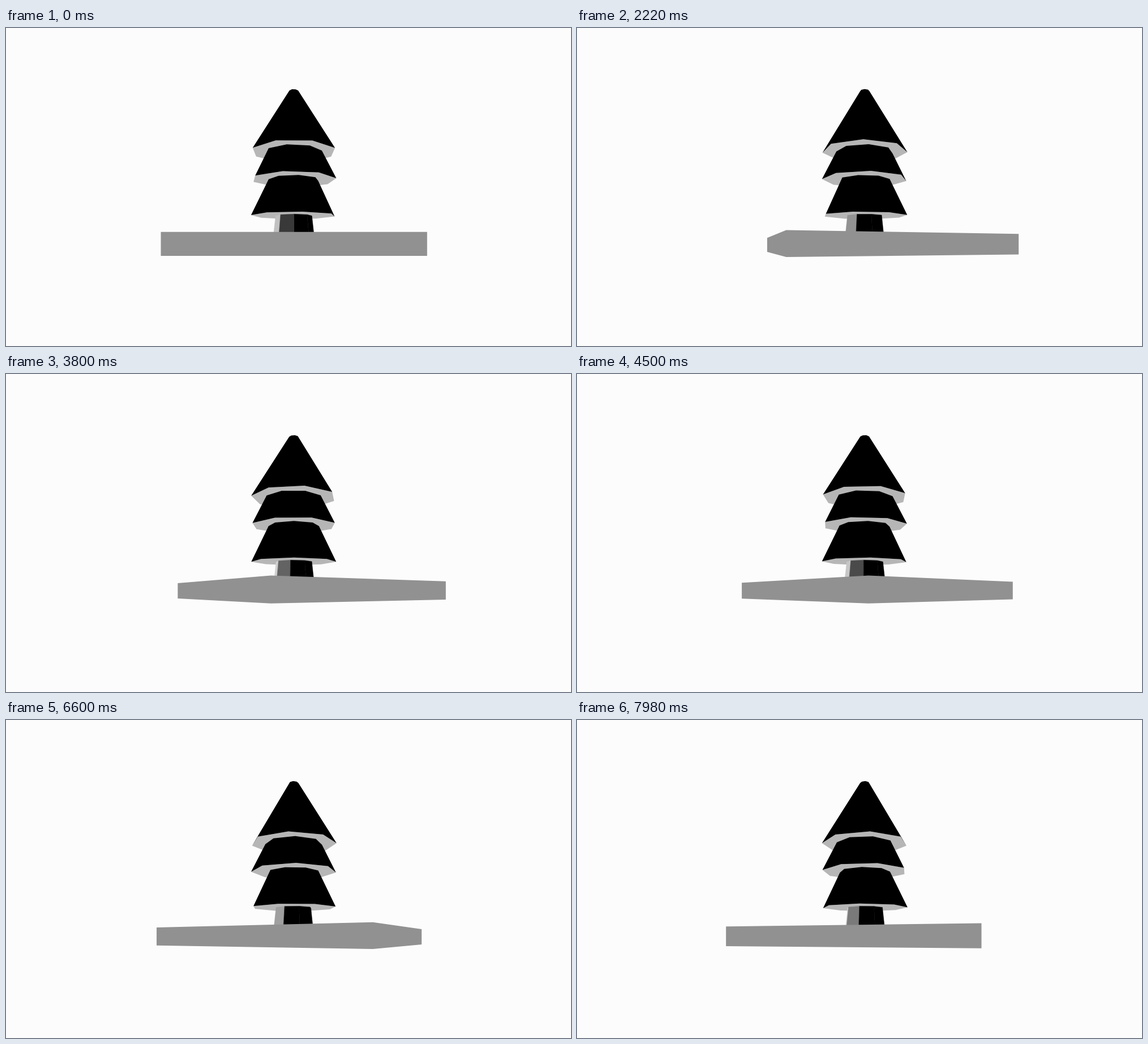
An HTML page with a canvas that plays this animation: 998 by 561 pixels, repeating every 8 s.

```html
<!DOCTYPE html>
<html lang="en">
<head>
<meta charset="utf-8">
<title>Turning tree</title>
<style>
  html, body { margin: 0; width: 100%; height: 100%; overflow: hidden; background: #fcfcfc; }
  canvas { display: block; }
</style>
</head>
<body>
<canvas id="stage" width="998" height="561"></canvas>
<script>
const ctx = document.getElementById('stage').getContext('2d');
const LOOP = 8000, START = 0.4, DEGREES_PER_SECOND = 9.2;
const AXIS_X = 508.3, HORIZON = 385.3, DISTANCE = 612;
const UNDERSIDE = '#b6b6b6', PLATFORM = '#919191';
const rad = degrees => degrees * Math.PI / 180;

// Each tier: lower radius and height, upper radius and height, twist in degrees.
const tiers = [
  [75, 165.8, 8.3, 273.7, 22.5],
  [75, 117, 50, 165.8, 31.5],
  [75, 54, 44.5, 117, 10]
];

// Platform corners as [radius, angle], angle 0 facing the viewer.
const corners = [[228, -138.4], [249.5, -40.9], [249.3, 40.4], [233, 136.7]];

let turn = 0;

function project([radius, angle], height) {
  const a = rad(angle + turn);
  const scale = 1 / (1 - radius * Math.cos(a) / DISTANCE);
  return [AXIS_X + radius * Math.sin(a) * scale, HORIZON - height * scale];
}

const octagon = (radius, twist) =>
  Array.from({ length: 8 }, (_, i) => [radius, twist + i * 45]);

function tracePolygon(points) {
  points.forEach(([x, y], i) => i ? ctx.lineTo(x, y) : ctx.moveTo(x, y));
  ctx.closePath();
}

function fillPolygons(polygons, color) {
  ctx.beginPath();
  polygons.forEach(tracePolygon);
  ctx.fillStyle = color;
  ctx.fill();
}

function facesViewer([a, b, c, d]) {
  return (c[0] - a[0]) * (d[1] - b[1]) - (c[1] - a[1]) * (d[0] - b[0]) < 0;
}

// Visible side faces of a prism or frustum, with the index of each face.
function sides(lower, low, upper, high) {
  const bottom = lower.map(p => project(p, low));
  const top = upper.map(p => project(p, high));
  return bottom.map((point, i) => {
    const next = (i + 1) % bottom.length;
    return { index: i, quad: [point, bottom[next], top[next], top[i]] };
  }).filter(face => facesViewer(face.quad));
}

function drawTier([radius, low, topRadius, high, twist]) {
  const base = octagon(radius, twist);
  fillPolygons([base.map(p => project(p, low))], UNDERSIDE);
  const faces = sides(base, low, octagon(topRadius, twist), high);
  fillPolygons(faces.map(face => face.quad), '#000');
}

// Light comes from the left, slightly behind the tree.
function trunkShade(normal) {
  const light = Math.max(0, Math.sin(rad(-normal - 14)));
  const gray = Math.round(225 * light ** 0.7);
  return `rgb(${gray},${gray},${gray})`;
}

function drawTrunk() {
  for (const { index, quad } of sides(octagon(36, 0), 17.7, octagon(32, 0), 54)) {
    const normal = (index * 45 + 22.5 + turn + 180) % 360 - 180;
    fillPolygons([quad], trunkShade(normal));
    ctx.strokeStyle = ctx.fillStyle;
    ctx.lineWidth = 0.5;
    ctx.stroke();
  }
}

function drawPlatform() {
  const faces = sides(corners, -11.5, corners, 17.7);
  fillPolygons(faces.map(face => face.quad), PLATFORM);
}

function draw() {
  const time = performance.now() % LOOP;
  turn = START + DEGREES_PER_SECOND * time / 1000;
  ctx.fillStyle = '#fcfcfc';
  ctx.fillRect(0, 0, 998, 561);
  tiers.forEach(drawTier);
  drawTrunk();
  drawPlatform();
  requestAnimationFrame(draw);
}
draw();
</script>
</body>
</html>
```
